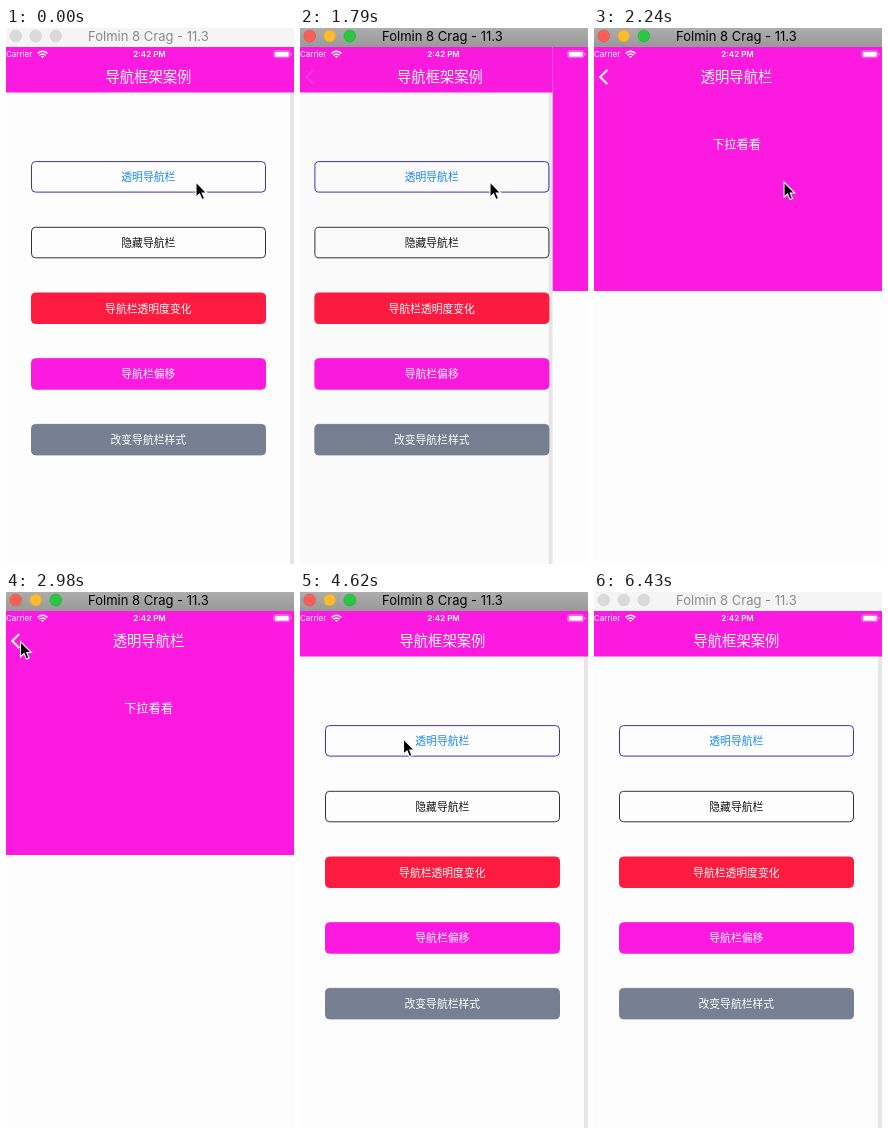
Animation of 288x536 px, one loop 6.53 s. Source, as an HTML page:

```html
<!DOCTYPE html>
<html lang="zh-CN">
<head>
<meta charset="utf-8">
<title>Navigation demo</title>
<style>
  html, body { margin: 0; width: 100%; height: 100%; overflow: hidden; background: #fdfdfd; }
  svg { display: block; width: 288px; height: 536px; }
  text { text-anchor: middle; font-family: "Noto Sans CJK SC", "Noto Sans CJK", sans-serif; }
  .latin { font-family: Inter, "Liberation Sans", sans-serif; }
  .pink { fill: #fc1ae0; }
  .title { font-size: 14.3px; fill: #fff; font-weight: 350; }
  #buttons text { font-size: 10.8px; }
  .status { font-size: 8px; fill: #fff; }
  #windowBar text { font-size: 13px; fill: #000; }
  #windowBar.idle text { fill: #8a8a8a; }
  #windowBar.idle rect { fill: #f5f5f5; }
  #windowBar.idle circle { fill: #dadada; stroke: #cfcfcf; }
</style>
</head>
<body>
<svg viewBox="0 0 288 536">
  <defs>
    <linearGradient id="metal" x2="0" y2="1">
      <stop stop-color="#adadad"/><stop offset="1" stop-color="#999"/>
    </linearGradient>
  </defs>

  <g id="home">
    <rect width="400" height="536" fill="#fdfdfd"/>
    <rect class="pink" y="19" width="400" height="45.5"/>
    <g id="buttons"></g>
  </g>
  <rect id="dim" width="288" height="536"/>

  <g id="detail">
    <rect id="shadow" x="-4" y="64" width="4" height="472"/>
    <rect width="288" height="536" fill="#fdfdfd"/>
    <rect class="pink" y="19" width="288" height="244"/>
  </g>
  <text id="hint" x="142.5" y="121.2" font-size="12.2" fill="#fff">下拉看看</text>

  <text id="homeTitle" class="title" x="142.4" y="54">导航框架案例</text>
  <text id="detailTitle" class="title" x="142.5" y="54">透明导航栏</text>
  <path id="back" d="M13.3 42L6.2 49l7.1 7" fill="none" stroke="#fff" stroke-width="2"/>

  <text class="status latin" x="0" y="29.4" style="text-anchor:start">Carrier</text>
  <text class="status latin" x="143.5" y="29.4" font-weight="600">2:42 PM</text>
  <g fill="none" stroke="#fff" stroke-width="1.5">
    <path d="M31.6 25.4q4.9-4.4 9.8 0M33.4 27.3q3.1-2.7 6.2 0"/>
    <path d="M36.5 29.9l-1.6-1.6q1.6-1.2 3.2 0z" fill="#fff" stroke="none"/>
  </g>
  <rect x="267.7" y="22.7" width="16" height="7" rx="1.8" fill="none" stroke="#fff" stroke-opacity=".45" stroke-width=".7"/>
  <rect x="268.7" y="23.7" width="14" height="5" rx="1" fill="#fff"/>
  <rect x="284.4" y="25" width="1" height="2.4" rx=".5" fill="#fff" opacity=".5"/>

  <g id="windowBar">
    <rect width="288" height="19" fill="url(#metal)"/>
    <circle cx="9.7" cy="8" r="5.9" fill="#fd5f57" stroke="#e0483f" stroke-width=".5"/>
    <circle cx="29.7" cy="8" r="5.9" fill="#fdbc2e" stroke="#dfa023" stroke-width=".5"/>
    <circle cx="49.8" cy="8" r="5.9" fill="#28c840" stroke="#1dab2f" stroke-width=".5"/>
    <text class="latin" x="142.4" y="13">Folmin 8 Crag - 11.3</text>
  </g>

  <path id="cursor" d="M0 0V15.2L3.5 12 6 17.6 8.6 16.5 6.2 11H10.8Z" fill="#000" stroke="#fff" stroke-width="1.1"/>
</svg>

<script>
const LOOP = 6530, STEP = 150, WIDTH = 288;
const PUSH = 1790, POP = 4020;
const $ = id => document.getElementById(id);

// label, fill, border, text colour
const buttons = [
  ['透明导航栏', '#fdfdfd', '#3a30d6', '#1787fb'],
  ['隐藏导航栏', '#fdfdfd', '#303038', '#111'],
  ['导航栏透明度变化', '#fd1b3f', '#fd1b3f', '#fff'],
  ['导航栏偏移', '#fc1ae0', '#fc1ae0', '#fff'],
  ['改变导航栏样式', '#768092', '#768092', '#fff'],
];
$('buttons').innerHTML = buttons.map(([label, fill, border, ink], i) => {
  const y = 133.6 + i * 65.7;
  return `<rect x="25.5" y="${y}" width="234" height="30.5" rx="4" fill="${fill}" stroke="${border}"/>
    <text x="142.3" y="${y + 19.5}" fill="${ink}">${label}</text>`;
}).join('');

// time, x, y of the pointer tip
const pointer = [
  [0, 190, 154], [2390, 188, 153], [2540, 85, 88], [2680, 27, 51], [2830, 21, 50],
  [2980, 14.5, 49.5], [4320, 25, 65], [4470, 96, 137], [4620, 103.5, 147],
  [5360, 104, 148], [5660, 109, 150],
];

function spring(ms, lead) {
  const s = (Math.floor(ms / STEP) * STEP + lead) / 1000 * 18.26;
  const v = 1 - (1 + s) * Math.exp(-s);
  return v > .998 ? 1 : v;
}

const slide = (id, x, y = 0) => $(id).setAttribute('transform', `translate(${x} ${y})`);
const fade = (id, a) => $(id).setAttribute('opacity', a);

function draw(t) {
  const popping = t >= POP;
  const open = t < PUSH ? 0 : popping ? 1 - spring(t - POP, 115) : spring(t - PUSH, 33);
  const rest = 1 - open;

  slide('home', -.3 * WIDTH * open);
  fade('dim', .1 * open);
  slide('detail', WIDTH * rest);
  fade('shadow', .09 * rest);
  slide('hint', WIDTH * 1.1 * rest);
  slide('homeTitle', -(popping ? 23 : 20) * open);
  fade('homeTitle', 1 - open ** 1.8);
  slide('detailTitle', (popping ? 159 : 216) * rest);
  fade('detailTitle', open ** .8);
  fade('back', t >= 3870 && !popping ? .4 : open);

  $('windowBar').classList.toggle('idle', t < 1640 || t >= 6430);
  const [, x, y] = pointer.filter(p => p[0] <= t).pop();
  slide('cursor', x, y);
  fade('cursor', t < 5810 ? 1 : 0);
}

const start = performance.now();
function tick() {
  draw((performance.now() - start) % LOOP);
  requestAnimationFrame(tick);
}
tick();
</script>
</body>
</html>
```
